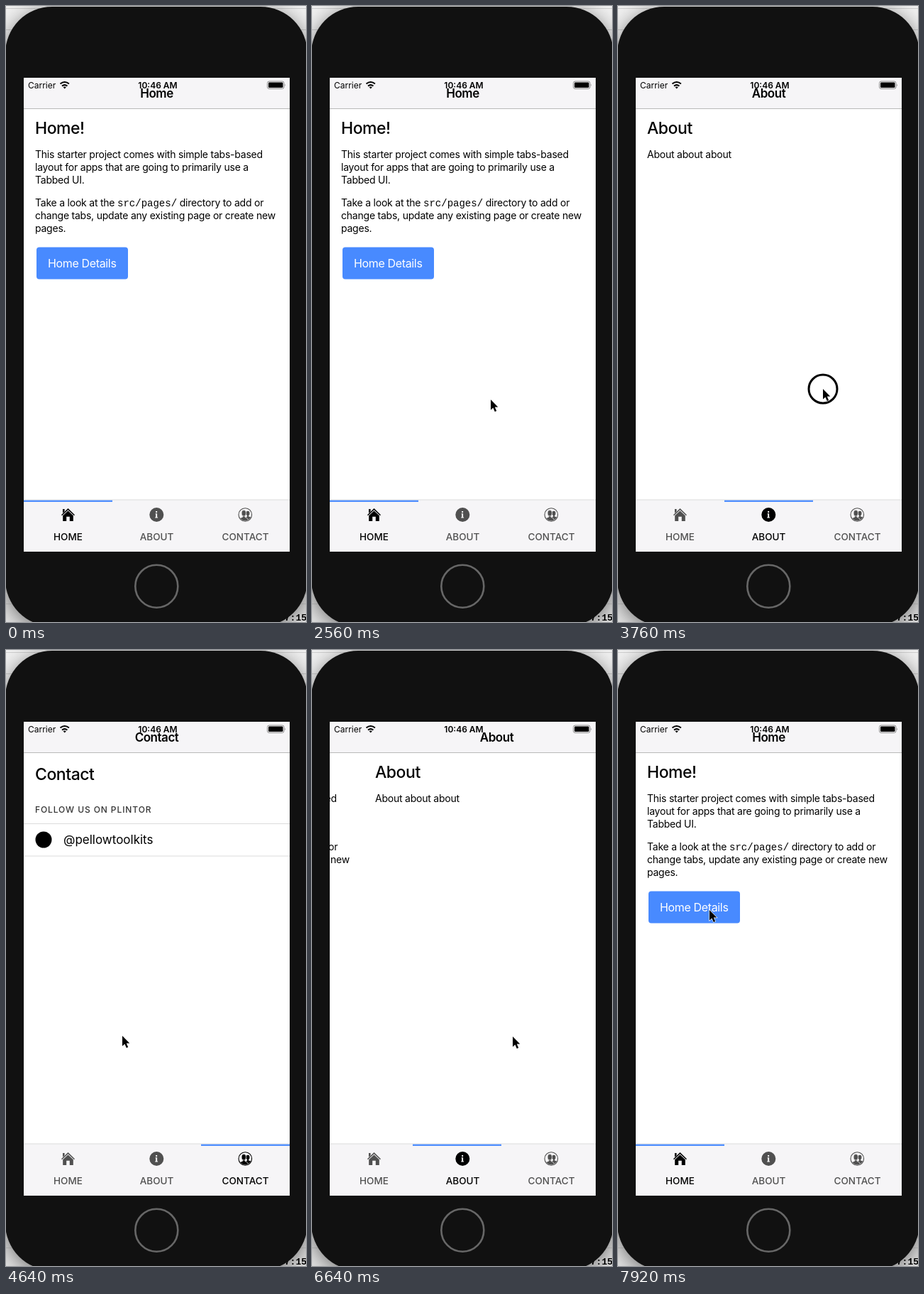
An HTML page for the animation above (8000 ms loop, 423x867 px).

```html
<!DOCTYPE html>
<html lang="en">
<head>
<meta charset="utf-8">
<title>Swipeable tabs</title>
<style>
  html, body { margin: 0; width: 100%; height: 100%; overflow: hidden; background: #ececec; }
  svg { display: block; width: 423px; height: 867px; font-family: Inter, Roboto, sans-serif; }
  .case { fill: #111; filter: drop-shadow(0 5px 14px rgba(0, 0, 0, .5)); }
  .clock { font: bold 13px "Liberation Mono", monospace; text-anchor: end; }
  .bar { fill: #f6f5f7; }
  .rule { fill: none; stroke: #dcdcdc; }
  .title { font-size: 17px; font-weight: 600; letter-spacing: -.028em; text-anchor: middle; }
  .head { font-size: 23px; font-weight: 500; letter-spacing: -.02em; }
  .body { font-size: 14px; letter-spacing: -.016em; }
  .code { font-family: "Liberation Mono", monospace; letter-spacing: 0; }
  .button { font-size: 16px; letter-spacing: -.022em; fill: #fff; }
  .label { font-size: 12px; font-weight: 500; letter-spacing: .9px; fill: #333; }
  .item { font-size: 17px; }
  .status { font-size: 12px; }
  .tab { color: #505050; fill: currentColor; }
  .tab.on { color: #000; }
  .tab text { font-size: 13.5px; font-weight: 500; text-anchor: middle; }
</style>
</head>
<body>
<svg viewBox="0 0 423 867">
  <defs>
    <clipPath id="screen"><rect x="25" y="101" width="375" height="667"/></clipPath>
    <clipPath id="disc"><circle r="8.6"/></clipPath>
    <linearGradient id="desk" x2="0" y2="1">
      <stop offset="0" stop-color="#f1f1f1"/><stop offset="1" stop-color="#e4e4e4"/>
    </linearGradient>
  </defs>

  <rect width="423" height="867" fill="url(#desk)"/>
  <path d="M0 3.5H423M0 33.5H423M0 841.5H423" stroke="#cfcfcf"/>
  <text class="clock" x="424" y="865">07:15</text>
  <rect class="case" x="-1" y="1" width="426" height="872" rx="66"/>
  <circle cx="212.3" cy="816.7" r="30" fill="none" stroke="#676767" stroke-width="2.6"/>

  <g clip-path="url(#screen)">
    <rect x="25" y="101" width="375" height="667" fill="#fff"/>
    <rect class="bar" x="25" y="101" width="375" height="43"/>
    <path d="M25 144.5H400" stroke="#b9b9b9"/>

    <g id="pages">
      <g>
        <text class="title" x="212.5" y="128.5">Home</text>
        <text class="head" x="41" y="180">Home!</text>
        <text class="body">
          <tspan x="41" y="214">This starter project comes with simple tabs-based</tspan>
          <tspan x="41" y="232">layout for apps that are going to primarily use a</tspan>
          <tspan x="41" y="250">Tabbed UI.</tspan>
          <tspan x="41" y="282">Take a look at the <tspan class="code">src/pages/</tspan> directory to add or</tspan>
          <tspan x="41" y="300">change tabs, update any existing page or create new</tspan>
          <tspan x="41" y="318">pages.</tspan>
        </text>
        <rect x="43" y="339.5" width="129" height="45" rx="4" fill="#488aff"/>
        <text class="button" x="59" y="368">Home Details</text>
      </g>
      <g transform="translate(375)">
        <text class="title" x="212.5" y="128.5">About</text>
        <text class="head" x="41" y="180">About</text>
        <text class="body" x="41" y="214">About about about</text>
      </g>
      <g transform="translate(750)">
        <text class="title" x="212.5" y="128.5">Contact</text>
        <text class="head" x="41" y="183">Contact</text>
        <text class="label" x="41" y="228.5">FOLLOW US ON PLINTOR</text>
        <path class="rule" d="M25 244.5H400M25 290H400"/>
        <circle cx="53" cy="267" r="11.5"/>
        <text class="item" x="81" y="273">@pellowtoolkits</text>
      </g>
    </g>

    <text class="status" x="31" y="115.5">Carrier</text>
    <g fill="none" stroke="#000" stroke-width="2">
      <path d="M76.5 109.6Q82.7 104.4 88.9 109.6M79 112.6Q82.7 109.6 86.4 112.6"/>
    </g>
    <path d="M80.6 114.2Q82.7 112.8 84.8 114.2L82.7 116.6z"/>
    <text class="status" x="214" y="115.5" text-anchor="middle" font-weight="600">10:46 AM</text>
    <rect x="368.5" y="106" width="23.5" height="10.5" rx="2.5" fill="none" stroke="#8a8a8a"/>
    <rect x="370" y="107.5" width="20.5" height="7.5" rx="1.2"/>
    <path d="M393.3 109.5q1.6 1.7 0 3.6z" fill="#8a8a8a"/>

    <rect class="bar" x="25" y="695" width="375" height="73"/>
    <path class="rule" d="M25 695H400"/>
    <rect id="mark" y="695.7" width="125" height="2.2" fill="#488aff"/>

    <g class="tab">
      <path d="M78 716.3L87.5 707L97 716.3L96 717.3L87.5 709.2L79 717.3zM80 708h2.6v3.2l-2.6 2.6z"/>
      <path d="M80.2 717.3L87.5 710.4L94.8 717.3V725H89.8V718.7H85.2V725H80.2z"/>
      <text x="87.5" y="752">HOME</text>
    </g>
    <g class="tab">
      <circle cx="212.3" cy="716" r="10"/>
      <path d="M210.8 714.2h2.3v5.4h1v1h-3.9v-1h1v-4.4h-.6zM211.2 711h1.9v1.9h-1.9z" fill="#fff"/>
      <text x="212.5" y="752">ABOUT</text>
    </g>
    <g class="tab">
      <g transform="translate(337.3 716)">
        <circle r="9.3" fill="none" stroke="currentColor" stroke-width="1.1"/>
        <g clip-path="url(#disc)">
          <ellipse cx="3.7" cy="-2" rx="2.5" ry="3.2"/>
          <path d="M1 9V3.6L2.8 2.6V0h2V2.4Q8.6 3.2 9 5.2V9z"/>
          <g stroke="#f6f5f7" stroke-width=".7">
            <path d="M-9 10V6.4Q-8 4.4 -3.8 3.4V1H-.2V3.4Q3 4.4 3.8 6.4V10z"/>
            <ellipse cx="-2" cy="-2.2" rx="3.2" ry="4.2"/>
          </g>
        </g>
      </g>
      <text x="337.5" y="752">CONTACT</text>
    </g>
  </g>

  <g id="pointer">
    <circle id="press" r="20" fill="none" stroke="#000" stroke-width="3"/>
    <path d="M0 0V14.6L3.4 11.5L5.8 17L8.2 16L5.8 10.6H10.3z" stroke="#fff" stroke-width="1.2" paint-order="stroke"/>
  </g>
</svg>

<script>
  const LOOP = 8000, STEP = 80, LAG = 80;
  const linear = k => k;
  const smooth = k => k * k * (3 - 2 * k);
  const settle = k => 1 - (1 - k) ** 3;

  // time, x, y
  const path = [
    [480, 330, 890], [960, 318, 640], [1120, 318, 640], [1920, 262, 560],
    [2560, 252, 554], [2720, 272, 549], [2960, 160, 545], [3200, 155, 545],
    [3680, 289, 539], [3840, 289, 539], [4080, 164, 543], [4640, 164, 543],
    [4800, 145, 542], [5120, 238, 538], [5600, 238, 538], [6080, 222, 544],
    [6400, 235, 545], [6480, 235, 545], [6640, 283, 544], [6880, 290, 542],
    [7760, 129, 366]
  ];
  // time, page, easing into this step
  const swipe = [
    [2720, 0], [2960, .3], [3280, 1, settle],
    [3840, 1], [4080, 1.33], [4400, 2, settle],
    [4800, 2], [5120, 1.75], [5440, 1, settle],
    [6480, 1], [6640, .872], [6960, 0, settle]
  ];
  const presses = [[2720, 3040], [3760, 4160], [4800, 5120], [6400, 6640]];

  function sample(track, t, col, ease) {
    const i = track.findIndex(s => s[0] > t);
    if (i === 0) return track[0][col];
    if (i < 0) return track[track.length - 1][col];
    const a = track[i - 1], b = track[i];
    const k = (ease || b[2] || linear)((t - a[0]) / (b[0] - a[0]));
    return a[col] + (b[col] - a[col]) * k;
  }

  const $ = id => document.getElementById(id);
  const pages = $('pages'), mark = $('mark'), pointer = $('pointer'), press = $('press');
  const tabs = document.querySelectorAll('.tab');

  function draw(now) {
    const t = Math.floor(now % LOOP / STEP) * STEP;
    const page = sample(swipe, t, 1);
    pages.setAttribute('transform', `translate(${-375 * page})`);
    mark.setAttribute('x', 25 + 125 * sample(swipe, t - LAG, 1));
    tabs.forEach((tab, i) => tab.classList.toggle('on', i === Math.round(page)));
    const x = sample(path, t, 1, smooth), y = sample(path, t, 2, smooth);
    pointer.setAttribute('transform', `translate(${x} ${y})`);
    press.style.display = presses.some(([a, b]) => t >= a && t < b) ? '' : 'none';
  }

  const start = performance.now();
  function tick() {
    draw(performance.now() - start);
    requestAnimationFrame(tick);
  }
  tick();
</script>
</body>
</html>
```
